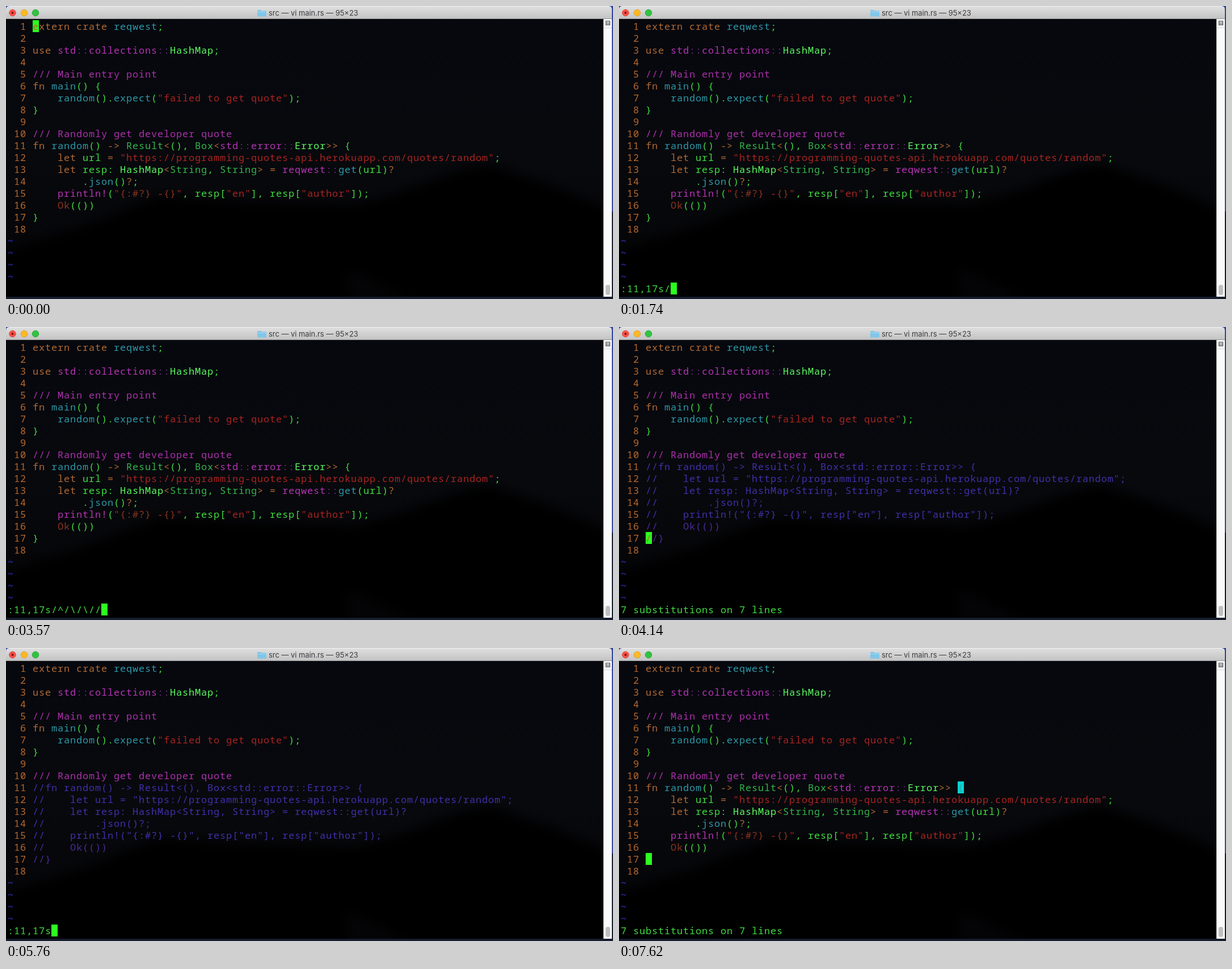
Write an HTML page that moves like this. It is 1070 by 516 pixels and loops after 7650 ms.

```html
<!DOCTYPE html>
<html lang="en">
<head>
<meta charset="utf-8">
<title>vi main.rs</title>
<style>
html, body { margin: 0; width: 100%; height: 100%; overflow: hidden; background: #000; }
#stage { position: absolute; left: 0; top: 0; width: 1070px; height: 516px; overflow: hidden; }
#stage > svg { position: absolute; left: 0; top: 0; }
#title {
  position: absolute; left: 463px; top: 2px; line-height: 21px; white-space: pre;
  font-family: Inter, Roboto, sans-serif; font-size: 12.9px; color: #3c3c40;
}
.row, .cell {
  position: absolute; height: 21px; line-height: 21px; white-space: pre;
  font-family: "Noto Sans Mono", "DejaVu Sans Mono", monospace;
  font-size: 17px; font-weight: 200; letter-spacing: calc(11px - 1ch);
  font-variant-ligatures: none;
}
.row { left: 3px; }
.cell { width: 11px; color: #b06a28; }
#cursor { background: #2cff20; }
#match { background: #08d4d4; color: #2ca8a0; }
.n { color: #b8682c; }
.o { color: #b06a34; }
.t { color: #2c98a8; }
.g { color: #40dc40; }
.b { color: #5cfa60; }
.d { color: #34b44c; }
.m { color: #b434b4; }
.c { color: #6c2880; }
.p { color: #ac30ac; }
.r { color: #a82420; }
.k { color: #8a3420; }
.v { color: #4030a8; }
.w { color: #4a2c98; }
.u { color: #3434e0; }
</style>
</head>
<body>
<div id="stage">
<svg width="1070" height="516" viewBox="0 0 1070 516">
  <defs>
    <linearGradient id="bar" x1="0" y1="0" x2="0" y2="1">
      <stop offset="0" stop-color="#e0e0e0"/><stop offset="1" stop-color="#c2c2c2"/>
    </linearGradient>
    <linearGradient id="sky" x1="0" y1="0" x2="0" y2="1">
      <stop offset="0" stop-color="#06080e"/><stop offset=".5" stop-color="#08090d"/>
      <stop offset="1" stop-color="#040406"/>
    </linearGradient>
    <filter id="soft" x="-20%" y="-20%" width="140%" height="140%"><feGaussianBlur stdDeviation="10"/></filter>
    <clipPath id="view"><rect y="22" width="1053" height="490"/></clipPath>
  </defs>
  <rect width="1070" height="516" fill="#161c2c"/>
  <rect x="1068" width="2" height="362" fill="#33459c"/>
  <path d="M0 0H8V8H0ZM1060 0H1070V8H1060Z" fill="#33459c"/>
  <rect y="22" width="1068" height="490" fill="url(#sky)"/>
  <g clip-path="url(#view)">
    <g filter="url(#soft)">
      <path d="M-30 440 130 390 270 335 420 345 600 350V540H-30Z" fill="#030304"/>
      <path d="M540 370 690 330 790 292 850 278 960 315 1090 370V540H760L640 480 540 440Z" fill="#000"/>
    </g>
  </g>
  <path d="M0 23V6Q0 0 6 0H1062Q1068 0 1068 6V23Z" fill="url(#bar)"/>
  <path d="M5 .5H1063" stroke="#f0f0f0"/>
  <path d="M0 22.5H1068" stroke="#929292"/>
  <g stroke-width=".8">
    <circle cx="11.5" cy="12" r="5.8" fill="#fb5048" stroke="#d63c34"/>
    <circle cx="32" cy="12" r="5.8" fill="#fdb924" stroke="#d99a1c"/>
    <circle cx="52" cy="12" r="5.8" fill="#2fc440" stroke="#22a030"/>
  </g>
  <circle cx="11.5" cy="12" r="2" fill="#7a120c"/>
  <path d="M443 8Q443 7 444 7H449L450.500 8.500H458Q459 8.500 459 9.500V17.500Q459 18.500 458 18.500H444Q443 18.500 443 17.500Z" fill="#80c6e8"/>
  <path d="M443 10.500H459" stroke="#a4daf2"/>
  <rect x="1053" y="23" width="15" height="489" fill="#fafafa"/>
  <path d="M1053.500 23V512M1053 38.500H1068" stroke="#d8d8d8"/>
  <rect x="1057.500" y="26.500" width="7" height="7" fill="#f2f2f2" stroke="#4a4a4a"/>
  <path d="M1058 29H1065M1058 31.500H1065" stroke="#4a4a4a"/>
  <rect x="1057" y="491" width="8" height="18" rx="4" fill="#c0c0c0"/>
</svg>
<div id="title">src — vi main.rs — 95×23</div>
</div>
<script>
const LOOP = 7650, CELL = 11, LINE = 21, LEFT = 3, TOP = 25;
const stage = document.getElementById('stage');

// "~x" switches to colour class x
const code = [
  '~oextern crate ~treqwest~g;',
  '',
  '~ouse ~mstd~c::~mcollections~c::~bHashMap~g;',
  '',
  '~p/// Main entry point',
  '~ofn ~tmain~g() {',
  '    ~trandom~g().~texpect~g(~r"failed to get quote"~g);',
  '~g}',
  '',
  '~p/// Randomly get developer quote',
  '~ofn ~trandom~g() ~o-> ~dResult~o<~g(), ~dBox~o<~mstd~c::~merror~c::~bError~o>> ~g{',
  '    ~olet ~gurl ~o= ~r"https://programming-quotes-api.herokuapp.com/quotes/random"~g;',
  '    ~olet ~gresp: ~bHashMap~o<~dString~g, ~dString~o> = ~mreqwest~c::~tget~g(url)~o?',
  '        ~g.~tjson~g()~o?~g;',
  '    ~mprintln!~g(~r"~k{:#?}~r -~k{}~r"~g, resp[~r"en"~g], resp[~r"author"~g]);',
  '    ~kOk~g(())',
  '~g}',
  ''
];

function div(cls, id) {
  const el = document.createElement('div');
  el.className = cls;
  if (id) el.id = id;
  stage.appendChild(el);
  return el;
}

function addRow(row, marked) {
  const el = div('row');
  el.style.top = TOP + row * LINE + 'px';
  marked.split('~').forEach((part, i) => {
    const span = document.createElement('span');
    if (i) span.className = part[0];
    span.textContent = i ? part.slice(1) : part;
    el.appendChild(span);
  });
  return el;
}

const live = [], muted = [];
code.forEach((line, i) => {
  const num = '~n' + String(i + 1).padStart(3) + ' ';
  const row = addRow(i, num + line);
  if (i < 10 || i > 16) return;
  live.push(row);
  muted.push(addRow(i, num + (i > 14 ? '~w' : '~v') + '//' + line.replace(/~./g, '')));
});
for (let r = 18; r < 22; r++) addRow(r, '~u').lastChild.textContent = '~';

const status = addRow(22, '~g').lastChild;
const match = div('cell', 'match');
const cursor = div('cell', 'cursor');

function place(el, row, col, text) {
  el.style.left = LEFT + col * CELL + 'px';
  el.style.top = TOP + row * LINE + 'px';
  el.textContent = text;
}
place(match, 10, 54, '{');

// Key press times; the last one is Enter
const runs = [
  { text: ':11,17s/^/\\/\\//',
    keys: [540, 750, 870, 1050, 1230, 1350, 1500, 1680, 2130, 2430, 2790, 3000, 3180, 3360, 3540, 3840] },
  { text: ':11,17s/\\/\\///',
    keys: [4650, 4860, 4980, 5160, 5310, 5430, 5640, 5910, 6180, 6390, 6570, 6750, 7020, 7260, 7500] }
];

function show(els, on) {
  for (const el of els) el.style.visibility = on ? 'visible' : 'hidden';
}

function stateAt(t) {
  let s = { text: '', row: 0, col: 4, char: 'e', done: 0 };
  runs.forEach((run, i) => {
    const n = run.keys.filter(k => k <= t).length;
    if (!n) return;
    if (n > run.text.length) {
      s = { text: '7 substitutions on 7 lines', row: 16, col: 4, char: i ? ' ' : '/', done: i + 1 };
    } else {
      s = { text: run.text.slice(0, n), row: 22, col: n, char: ' ', done: i };
    }
  });
  return s;
}

let last = '';
function draw(t) {
  const s = stateAt(t), key = s.text + s.done;
  if (key === last) return;
  last = key;
  status.textContent = s.text;
  place(cursor, s.row, s.col, s.char);
  show(live, s.done !== 1);
  show(muted, s.done === 1);
  show([match], s.done === 2);
}

const start = performance.now();
function tick() {
  draw((performance.now() - start) % LOOP);
  requestAnimationFrame(tick);
}
draw(0);
requestAnimationFrame(tick);
</script>
</body>
</html>
```
